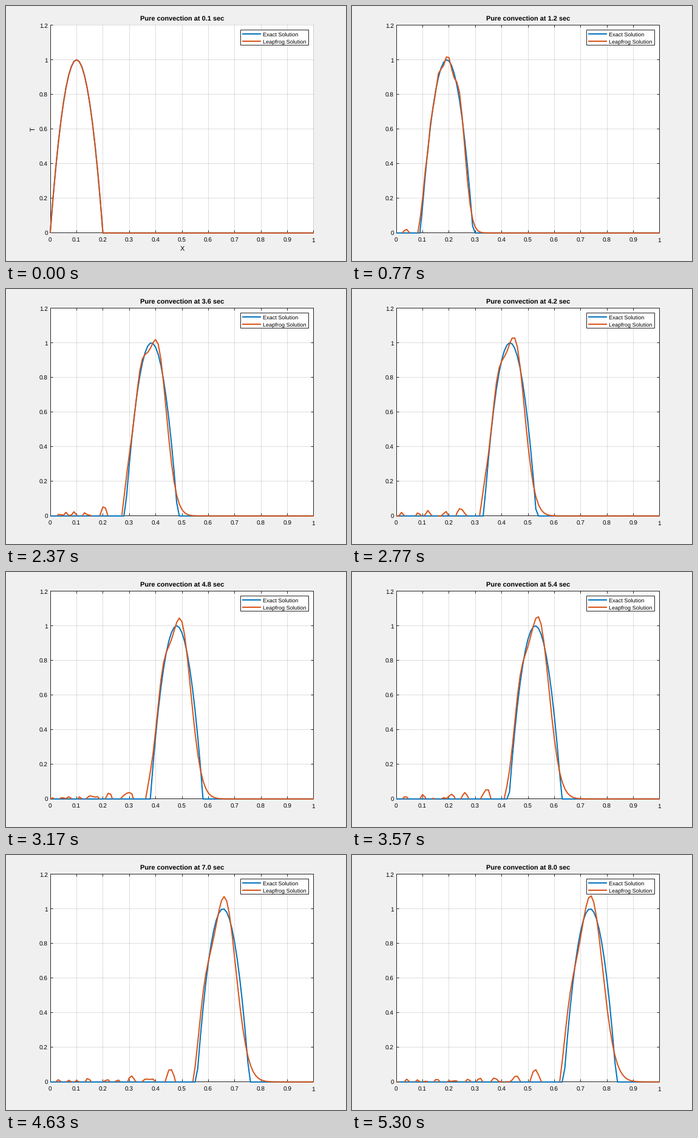
Recreate the animation shown at these times as a matplotlib script. Size 560 px wide and 420 px high, loop 5.33 s.

```python
import numpy as np
import matplotlib.pyplot as plt
from matplotlib.animation import FuncAnimation
from matplotlib.patches import Rectangle
from matplotlib.transforms import Affine2D

W, H, DPI = 560, 420, 100
PX = 72 / DPI                      # one pixel in points
LOOP, STEPS = 5330, 160
BLUE, ORANGE, INK = "#0072BD", "#D95319", "#262626"

SPEED, DX, DT = 0.08, 0.01, 0.05
CFL = SPEED * DT / DX

# Plot box in pixels, y pointing down
LEFT, RIGHT, TOP, BOTTOM = 72.56, 506.48, 31.2, 373.45

plt.rcParams["font.family"] = "Liberation Sans"
plt.rcParams["text.hinting"] = "none"

x = np.linspace(0, 1, 101)
fine = np.linspace(0, 1, 2001)


def exact(t):
    s = x - SPEED * t
    return np.where((s >= 0) & (s <= 0.2), 1 - (10 * s - 1) ** 2, 0)


def leapfrog():
    """Central differences in space; the first step is explicit Euler."""
    T = np.zeros((STEPS, x.size))
    T[0] = exact(0)
    for n in range(1, STEPS):
        old, c = (T[0], CFL / 2) if n == 1 else (T[n - 2], CFL)
        T[n, 1:-1] = old[1:-1] - c * (T[n - 1, 2:] - T[n - 1, :-2])
    return T


def above_axis(y):
    """Cut the curve where it dips below zero."""
    y = np.interp(fine, x, y)
    return np.where(y < -5e-4, np.nan, y)


T = leapfrog()

fig = plt.figure(figsize=(W / DPI, H / DPI), dpi=DPI, facecolor="#F0F0F0")

ax = fig.add_axes([LEFT / W, 1 - BOTTOM / H,
                   (RIGHT - LEFT) / W, (BOTTOM - TOP) / H])
ax.set(xlim=(0, 1), ylim=(0, 1.2),
       xticks=np.arange(11) / 10, yticks=np.arange(7) / 5)
ax.set_axisbelow(True)
ax.tick_params(direction="in", length=4.34 * PX, width=PX, color=INK,
               labelbottom=False, labelleft=False)
ax.grid(color=INK, alpha=0.15, lw=PX)
for line in ax.get_xgridlines() + ax.get_ygridlines():
    line.set_clip_on(False)
for spine in ax.spines.values():
    spine.set(linewidth=PX, color=INK, zorder=1)

# Rules snap to whole pixels, curves sit a fraction lower and to the right
curve = dict(lw=2 * PX, clip_on=False, solid_capstyle="butt", zorder=3,
             transform=ax.transData + Affine2D().translate(0.25, -0.35))
exact_line, = ax.plot([], [], color=BLUE, **curve)
leap_line, = ax.plot([], [], color=ORANGE, **curve)

# Overlay in pixel coordinates, y pointing down
page = fig.add_axes([0, 0, 1, 1])
page.set(xlim=(0, W), ylim=(H, 0))
page.axis("off")


def label(px, py, s, size=10, ha="center", va="baseline", **kw):
    return page.text(px, py, s, fontsize=size * PX, color="black",
                     ha=ha, va=va, **kw)


for i in range(11):
    label(LEFT + (RIGHT - LEFT) * i / 10, 388.6, f"{i / 10:g}")
for i in range(7):
    label(69, BOTTOM + 4.4 - (BOTTOM - TOP) * i / 6, f"{i / 5:g}", ha="right")

title = label(290, 24.6, "", 11, weight="bold")
names = [label(290.5, 403, "X", 11),
         label(45, 203, "T", 11, va="center", rotation=90)]

page.add_patch(Rectangle((386, 39), 112, 25, fc="white", ec=INK, lw=PX))
for y, color, name in [(46, BLUE, "Exact Solution"),
                       (58, ORANGE, "Leapfrog Solution")]:
    page.plot([389, 420], [y, y], color=color, lw=2 * PX,
              solid_capstyle="butt")
    label(423, y + 4, name, 9.1, ha="left")


def update(k):
    first = k == 0
    for side in ("top", "right"):
        ax.spines[side].set_visible(not first)
    ax.tick_params(top=not first, right=not first)
    for text in names:
        text.set_visible(first)
    title.set_text(f"Pure convection at {(k + 1) * DT:.1f} sec")
    exact_line.set_data(x, exact(k * DT))
    leap_line.set_data(fine, above_axis(T[k]))
    return exact_line, leap_line, title


anim = FuncAnimation(fig, update, frames=STEPS, interval=LOOP / STEPS,
                     repeat=True, repeat_delay=0, blit=False)
plt.show()
```
